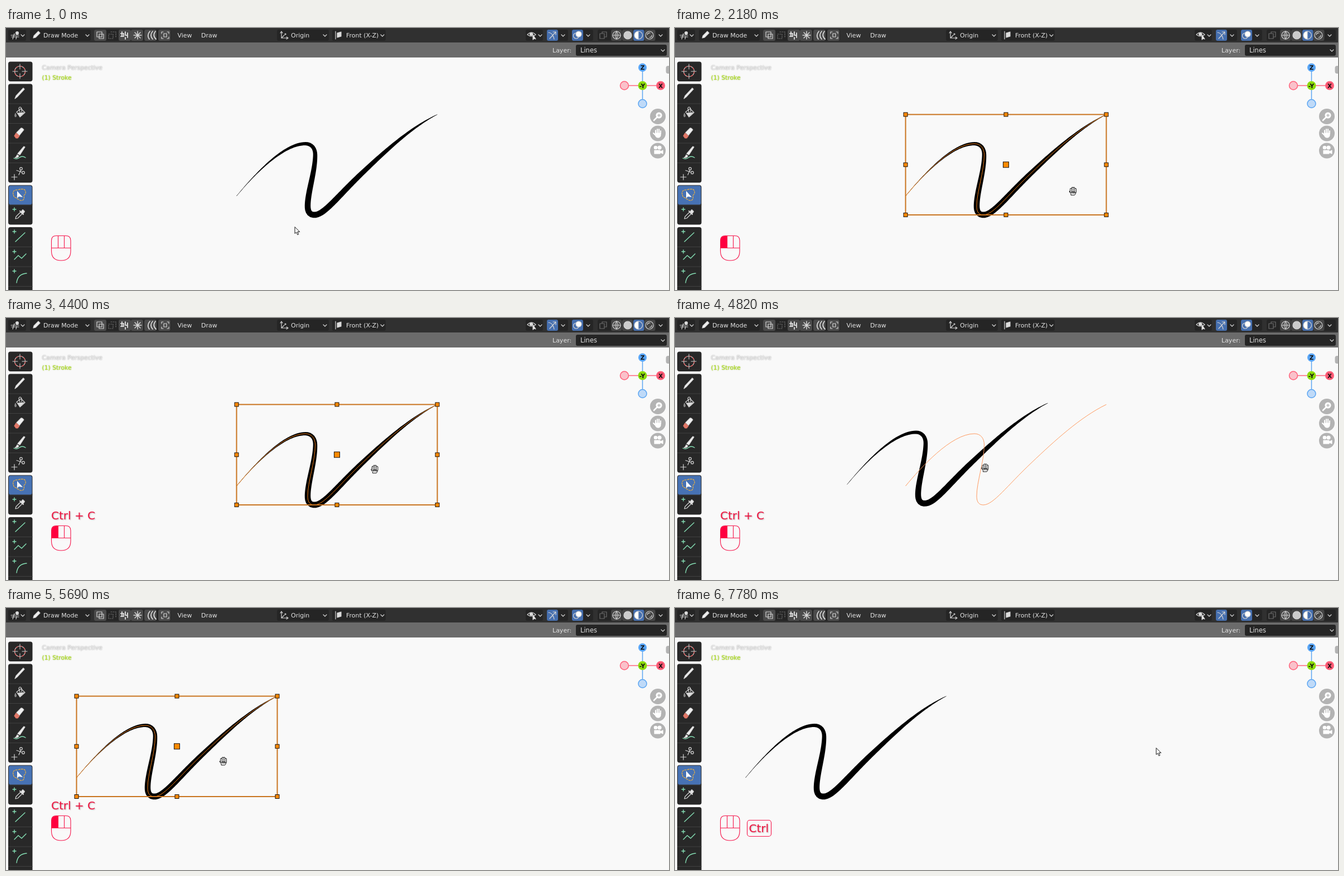
An HTML page for the animation above (8 s loop, 1189 by 471 pixels).

```html
<!DOCTYPE html>
<html lang="en">
<head>
<meta charset="utf-8">
<title>Copying a stroke</title>
<style>
html, body { margin: 0; width: 100%; height: 100%; overflow: hidden; background: #f9f9f9; }
svg { display: block; width: 1189px; height: 471px; font: 11px "DejaVu Sans", Verdana, sans-serif; }
.ui { fill: #e3e3e3; }
.icon { fill: none; stroke: #d6d6d6; stroke-width: 1.2; stroke-linecap: round; stroke-linejoin: round; }
.nav { stroke: #fff; }
.dim { opacity: .4; }
.green { fill: none; stroke: #85dfb4; stroke-width: 1.4; stroke-linecap: round; }
.axis { font-size: 10.5px; text-anchor: middle; font-weight: bold; fill: #111; }
.keys { fill: #f0123f; font-size: 20px; text-shadow: 1px 1px 2px rgba(90,30,45,.4); }
.red { fill: none; stroke: #f5144a; stroke-width: 1.1; }
.handle { fill: #ff8a00; stroke: #111; }
.pointer { fill: #fff; stroke: #111; stroke-linejoin: round; stroke-linecap: round; }
</style>
</head>
<body>
<svg viewBox="0 0 1189 471" xmlns="http://www.w3.org/2000/svg">
  <defs>
    <path id="spine" fill="none" d="M413.5 302C440 270 495 208 537 208C548 208 554.5 216 554.5 228C554.5 258 541 295 541 320C541 331 545 336 553 336C571 336 595 302 640 259.5C680 221.5 727 178 773.5 155.5"/>
    <path id="loop" d="M518 357C500 360 478 362 459 357C435 343 391 305 391 262C391 232 418 207 445 197S516 180 566 175S630 165 675 165C710 165 745 173 798 184L808 187"/>
  </defs>
  <path id="ink"/>
  <use id="trace" href="#spine" stroke="#ff9a60"/>
  <g id="gizmo">
    <use href="#spine" stroke="#ee7f18"/>
    <rect x="413.500" y="155.500" width="360" height="180.500" fill="none" stroke="#c9741f" stroke-width="2"/>
    <g id="handles"></g>
  </g>
  <path id="lassoBase" fill="none" stroke="#fff"/>
  <path id="lasso" fill="none" stroke="#222" stroke-dasharray="1 1"/>

  <rect width="1189" height="27" fill="#303030"/>
  <rect y="26" width="1189" height="27" fill="#6b6b6b"/>
  <g id="buttons"></g>
  <g class="ui">
    <text x="67" y="17">Draw Mode</text><text x="307.500" y="17">View</text>
    <text x="350" y="17">Draw</text><text x="511" y="17">Origin</text>
    <text x="610" y="17">Front (X-Z)</text><text x="980" y="44">Layer:</text>
    <text x="1030" y="44" font-size="11.500">Lines</text>
  </g>
  <g id="chevrons" class="icon"></g>

  <g class="icon">
    <path d="M10 16h13M12 20l3-10M18 20l1-5M9 13h14"/><circle cx="20" cy="9" r="2.500" fill="#ddd"/>
    <path d="M49 18l1-4 8-8 3 3-8 8z" fill="#eee"/>
    <path d="M163 7h9v9h-9zM167 11h8v8h-8z"/>
    <path class="dim" d="M184 19v-8h8v8zM188 7h9v9" stroke-dasharray="2 2"/>
    <path d="M208 7v8M206 10h5v5h-5M214 7v6h4M214 17v3M218 9v8" stroke-width="2"/>
    <path d="M236 6v14M229 13h14M231 8l10 10M241 8l-10 10" stroke-width="1.500"/>
    <path d="M258 6q-6 7-1 14M263 6q-6 7 0 14M268 6q-6 7 1 14" stroke-width="1.800"/>
    <path d="M279 10V7h3M289 7h3v3M292 16v3h-3M282 19h-3v-3M283 10h5v6h-5z"/>
    <path d="M494 8v10h10M494 18l5-5M492 9l2-3 2 3M503 16l3 2-3 2"/><circle cx="501" cy="11" r="1"/>
    <path d="M591 6v14M594 9l7-2v8l-7 2z" fill="#ddd"/>
    <path d="M935 12q7-8 15 0q-7 6-15 0z"/><circle cx="942" cy="11" r="2.500" fill="#ddd"/>
    <path d="M945 12v9l2-2 3 1z" fill="#eee"/>
    <path d="M973 8q8 1 10 12M975 19l11-12M981 7h5v5"/>
    <circle cx="1022.500" cy="14" r="5"/><circle cx="1027" cy="11" r="5" fill="#fff"/>
    <path class="dim" d="M1065 10h8v9h-8zM1069 10V7h8v9h-4"/>
    <circle cx="1095" cy="13" r="7"/><path d="M1088 13h14M1095 6v14M1095 6q-6 7 0 14M1095 6q6 7 0 14" stroke-width="1"/>
    <circle cx="1115" cy="13" r="7" fill="#ccc"/>
    <circle cx="1134.500" cy="13" r="7"/><path d="M1134 6a7 7 0 0 0 0 14z" fill="#fff"/>
    <circle cx="1154" cy="13" r="7"/><path d="M1150 12q1-4 5-3M1158 13q0 4-4 4"/>
  </g>

  <g font-size="10.800">
    <text x="64.500" y="74.500" fill="#ececec" style="text-shadow:0 0 2px #888">Camera Perspective</text>
    <text x="64.500" y="93" fill="#b0e020" style="text-shadow:0 0 2px #8fae40">(1) Stroke</text>
  </g>

  <g id="toolbar"></g>
  <g class="icon">
    <circle cx="25" cy="78" r="9.500"/><circle cx="25" cy="78" r="9.500" stroke="#e54848" stroke-dasharray="3.700 3.700"/>
    <path d="M25 65v9M25 82v9M12 78h9M29 78h9" stroke-width="1"/>
    <path d="M16 127l2-5 13-14 2 2-13 14z" fill="#f1f1f1"/>
    <path d="M19 151l8-6 7 7-9 8z"/><path d="M21 153l11-1-7 7z" fill="#ddd"/><path d="M25 151q-4-8 0-9 4 0 3 9"/><path d="M17 152q-3 5-1 8 3 1 3-3z" fill="#888" stroke="none"/>
    <path d="M19 188l8-8q2-1 5 3l-8 10z" fill="#f1f1f1"/><path d="M18 189l6 5-3 4h-3l-3-4z" fill="#e07767" stroke="#e07767"/>
    <path d="M21 226l11-13 2 1-9 14zM20 228l3 2q-2 4-7 3 3-1 4-5z" fill="#eee"/><path class="green" d="M14 234q5 3 10-1t11 0"/>
    <path d="M19 256l9 3M23 264l4-9M10 268h10M15 263v10"/><circle cx="27" cy="253" r="2.300"/><circle cx="31" cy="260" r="2.300"/>
    <path d="M13 299q-2-8 8-8 13-4 14 3 1 4-3 7 2 10-6 9-5-2-8-5-4 0-5-6z" stroke="#f0b13d" stroke-dasharray="3 2"/>
    <path d="M20 293v13l3-3 7 1z" fill="#fff" stroke="none"/>
    <path d="M17 343l1-4 8-8 3 3-8 8z"/><path d="M25 329l6 6M27 331l3-4 3 3-3 4z" fill="#eee" stroke-width="2"/>
  </g>
  <path class="green" d="M17 384l17-16M15 416l7-7 6 5 8-8M19 458q2-16 18-17"/>
  <path id="pluses" class="green" stroke-width="2"/>

  <g stroke-width="1.500">
    <path d="M1141.500 71v65" stroke="#5ba5f2"/><path d="M1109 103.500h65" stroke="#ff6079"/>
    <circle cx="1141.500" cy="71" r="7.500" fill="#58a5f8"/><circle cx="1141.500" cy="136" r="7.500" fill="#bfdaf8" stroke="#5ba5f2"/>
    <circle cx="1109" cy="103.500" r="7.500" fill="#fac1ca" stroke="#ff6079"/>
    <circle cx="1174" cy="103.500" r="8" fill="#ff5a75"/><circle cx="1141.500" cy="103.500" r="8" fill="#8cdb0a"/>
  </g>
  <g class="axis"><text x="1141.500" y="75">Z</text><text x="1174" y="107.500">X</text><text x="1141" y="107.500">-Y</text></g>
  <g fill="#b3b3b3"><circle cx="1169" cy="159" r="14"/><circle cx="1169" cy="189.500" r="14"/><circle cx="1169" cy="220.500" r="14"/><rect x="1183.500" y="68" width="12" height="14" rx="4"/></g>
  <g class="icon nav">
    <circle cx="1171" cy="157" r="5" fill="#fff"/><path d="M1167 161l-5 5" stroke-width="2.500"/><path d="M1168.500 157h5M1171 154.500v5" stroke="#aaa"/>
    <path d="M1164 192l-3-3M1165 190v-6M1168 189v-7M1171 189v-7M1174 190v-5" stroke-width="2"/><path d="M1164 189h10v4q-1 4-5 4-3 0-5-5z" fill="#fff"/>
    <circle cx="1165" cy="215" r="2.700" fill="#fff"/><circle cx="1172" cy="215" r="3" fill="#fff"/><path d="M1163 220h10v6h-10zM1174 222l4-2v6l-4-2z" fill="#fff"/>
  </g>

  <path id="pressed" d="M81.500 396V381.500q0-7.500 7.500-7.500h4.500v22z" fill="#ff0040"/>
  <path class="red" d="M90 373.500h17.500q8.500 0 8.500 8.500V401q0 17-17.200 17T81.500 401V382q0-8.500 8.500-8.500zM81.500 395.500H116M93.500 373.500v22M104.500 373.500v22"/>
  <g class="keys">
    <text id="shortcut" x="81" y="361.500">Ctrl + C</text>
    <g id="ctrl"><rect class="red" x="129.500" y="381.500" width="43" height="29" rx="4.500"/><text x="132.500" y="403.300">Ctrl</text></g>
  </g>
  <path id="arrow" class="pointer" d="M0 0v11.500l2.700-2.400 2.100 4.600 2-.9-2.100-4.400h3.600z"/>
  <g id="hand" class="pointer">
    <path d="M-3.500 7v-2l-3-4q0-2 3 0l1 1h8q.5 2-2 5z"/>
    <path d="M-3.500-3.500v5M-.8-5.500v6M1.900-5.500v6M4.600-3.500v5" stroke-width="3.600"/>
    <path d="M-3.500-3.500v5M-.8-5.500v6M1.900-5.500v6M4.600-3.500v5" stroke="#fff" stroke-width="1.700"/>
    <path d="M-1.500 2.500v2M1 2.500v2M3.300 2.500v2"/>
  </g>
</svg>
<script>
const LOOP = 8000;
const STEP = 120;
const LASSO_START = 510, LASSO_END = 1280;
const DRAG_START = 4700, DRAG_END = 5690;
const GRAB = { x: 661, y: 271.5 };
const DROP = { x: -287, y: 3 };

// Pointer moves: each goes to (x, y) in the given number of hard steps.
const moves = [
  { at: 250, steps: 2, x: 518, y: 350.5 },
  { at: LASSO_START, steps: 6, x: 816, y: 192.5 },
  { at: LASSO_END, steps: 3, x: 800, y: 279 },
  { at: 1910, steps: 3, x: 713.5, y: 293 },
  { at: 2860, steps: 3, x: 714.5, y: 286 },
  { at: 4140, steps: 3, ...GRAB },
  { at: DRAG_START, steps: 6, x: GRAB.x + DROP.x, y: GRAB.y + DROP.y, bend: 4 },
  { at: DRAG_END, steps: 1, x: 389.5, y: 275 },
  { at: 6110, steps: 2, x: 441, y: 274 },
  { at: 6390, steps: 2, x: 579, y: 269 },
  { at: 6820, steps: 2, x: 713, y: 269.5 },
  { at: 7090, steps: 4, x: 863, y: 252 }
];

const $ = id => document.getElementById(id);
const svgPath = points => "M" + points.map(p => `${p.x.toFixed(2)} ${p.y.toFixed(2)}`).join("L");
const within = (t, from, to) => t >= from && t < to;
const show = (id, on) => { $(id).style.display = on ? "" : "none"; };
const place = (id, { x, y }) => $(id).setAttribute("transform", `translate(${x} ${y})`);
const stepCount = (t, start) => 1 + Math.floor((t - start) / STEP);
const ease = u => Math.sin(Math.PI / 2 * u) ** 1.45;

function sample(id, part = 1, count = 160) {
  const path = $(id), length = path.getTotalLength() * part;
  return Array.from({ length: count + 1 }, (_, i) => path.getPointAtLength(length * i / count));
}

// Pen pressure swells slowly up to the lower bend and fades faster after it.
function pressure(u) {
  const peak = .53;
  const [rise, power] = u < peak ? [u / peak, 1.8] : [(1 - u) / (1 - peak), .9];
  return .5 + 10.2 * Math.max(0, Math.sin(Math.PI / 2 * rise)) ** power;
}

function ribbon(points) {
  const last = points.length - 1;
  const side = sign => points.map(({ x, y }, i) => {
    const p = points[Math.max(0, i - 1)], q = points[Math.min(last, i + 1)];
    const dx = q.x - p.x, dy = q.y - p.y;
    const k = sign * pressure(i / last) / 2 / Math.hypot(dx, dy);
    return { x: x - dy * k, y: y + dx * k };
  });
  return svgPath([...side(1), ...side(-1).reverse()]) + "Z";
}

const box = (x, y, w, h, fill, rx = 3) =>
  `<rect x="${x}" y="${y}" width="${w}" height="${h}" rx="${rx}" fill="${fill}"/>`;

function buildHeader() {
  const field = (x, w, y = 3) => box(x, y, w, 20, "#252525");
  const toggles = [158, 202, 224, 248, 273].map(x => box(x, 3, 22, 20, "#4b4b4b"));
  const shading = [1085, 1105, 1125, 1145].map((x, i) => box(x, 3, 19.5, 20, i === 2 ? "#466fae" : "#454545"));
  $("buttons").innerHTML = [
    field(4, 32), field(43, 109), field(158, 138), field(486, 93), field(585, 96),
    field(932, 31), field(970, 38), field(1015, 38), field(1061, 124), field(1022, 163, 30),
    box(970, 3, 20, 20, "#466fae"), box(1015, 3, 20, 20, "#466fae"), ...toggles, ...shading
  ].join("");
  const chevron = (x, y = 13) => `<path d="M${x - 3} ${y - 1}l3 3 3-3"/>`;
  $("chevrons").innerHTML =
    [30, 146, 572, 675, 958, 999, 1044, 1174].map(x => chevron(x)).join("") + chevron(1178, 40);
}

function buildToolbar() {
  const size = 35.5;
  const group = (y, count) => {
    let html = box(4, y, 43.5, count * size, "#282828", 4);
    for (let i = 1; i < count; i++) html += box(4, y + i * size - .5, 43.5, 1, "#414141", 0);
    return html;
  };
  $("toolbar").innerHTML = group(60.5, 1) + group(100.5, 5) + group(282.5, 2) + group(358, 4)
    + box(5, 283.5, 41.5, 34, "#4772b3", 3);
  $("pluses").setAttribute("d", [326, 366, 402, 437].map(y => `M12 ${y}h6M15 ${y - 3}v6`).join(""));
}

function buildGizmo() {
  for (let i = 0; i < 9; i++) {
    const x = 413.5 + (i % 3) * 180, y = 155.5 + Math.floor(i / 3) * 90.25;
    const size = i === 4 ? 10 : 7;
    $("handles").innerHTML +=
      `<rect class="handle" x="${x - size / 2}" y="${y - size / 2}" width="${size}" height="${size}"/>`;
  }
}

function pointerAt(t) {
  let point = { x: 518, y: 358 };
  for (const { at, steps, x, y, bend = 0 } of moves) {
    if (t < at) break;
    const p = ease(Math.min(1, stepCount(t, at) / steps));
    point = {
      x: point.x + (x - point.x) * p,
      y: point.y + (y - point.y) * p - bend * Math.sin(Math.PI * p)
    };
  }
  return point;
}

function render(t) {
  let pointer = pointerAt(t);
  let outline = "";
  if (within(t, LASSO_START, LASSO_END)) {
    const points = sample("loop", Math.min(1, stepCount(t, LASSO_START) / 5.08));
    const tip = points.at(-1);
    outline = svgPath(points) + "Z";
    pointer = { x: tip.x + 8, y: tip.y + 5.5 };
  }
  $("lasso").setAttribute("d", outline);
  $("lassoBase").setAttribute("d", outline);

  const dragging = within(t, DRAG_START, DRAG_END);
  const offset = dragging ? { x: pointer.x - GRAB.x, y: pointer.y - GRAB.y }
    : t < DRAG_START ? { x: 0, y: 0 } : DROP;
  place("ink", offset);
  place("gizmo", offset);
  show("gizmo", within(t, 1400, 7350) && !dragging);
  show("trace", dragging);

  const grabbing = within(t, 2030, 6390);
  show("hand", grabbing);
  show("arrow", !grabbing);
  place(grabbing ? "hand" : "arrow", pointer);

  show("pressed", within(t, 250, 7480));
  show("shortcut", within(t, 3540, 6670));
  show("ctrl", within(t, 2860, 4140) || t >= 7780);
}

function tick() {
  render(performance.now() % LOOP);
  requestAnimationFrame(tick);
}

buildHeader();
buildToolbar();
buildGizmo();
$("ink").setAttribute("d", ribbon(sample("spine")));
tick();
</script>
</body>
</html>
```
